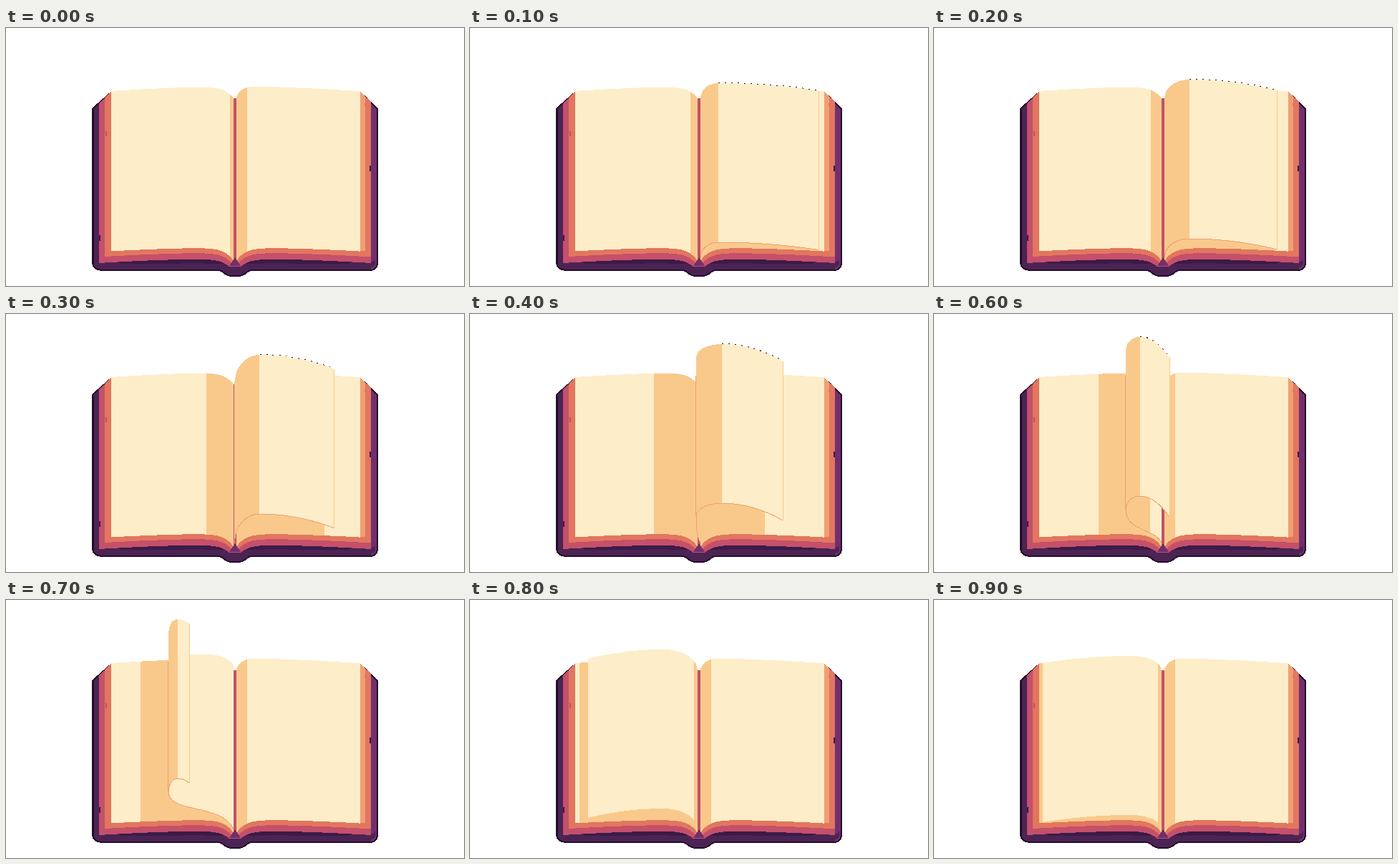
An HTML page for the animation above (1000 ms loop, 640x360 px).

```html
<!DOCTYPE html>
<html lang="en">
<head>
<meta charset="utf-8">
<title>Page turn</title>
<style>
html, body { margin: 0; width: 100%; height: 100%; overflow: hidden; background: #fff; }
svg { display: block; width: 640px; height: 360px; }
</style>
</head>
<body>
<svg id="stage" viewBox="0 0 640 360" shape-rendering="crispEdges"></svg>
<script>
const NS = 'http://www.w3.org/2000/svg';
const stage = document.getElementById('stage');
const INK = '#260d2b', INDIGO = '#3b1a49', PURPLE = '#4b2454', PLUM = '#70306b',
  ROSE = '#c5506a', CORAL = '#e2765f', PEACH = '#ef9f73', TAN = '#f9c98c', CREAM = '#fdedc8';
const MID = 320, LEFT = 147, RIGHT = 495, FRAMES = 10, STEP = 100;
const LEAF_HEIGHT = 222;
let gradients = 0;

function add(parent, tag, attrs) {
  const el = document.createElementNS(NS, tag);
  for (const k in attrs) el.setAttribute(k, attrs[k]);
  return parent.appendChild(el);
}
const fill = (g, d, color) => add(g, 'path', { d, fill: color });
const line = (g, d, color, more) => add(g, 'path', { d, fill: 'none', stroke: color, ...more });

// Points of y = f(x) from one x to another, in either direction
function trace(from, to, f) {
  const n = Math.max(1, Math.ceil(Math.abs(to - from) / 2));
  return Array.from({ length: n + 1 }, (_, i) => {
    const x = from + (to - from) * i / n;
    return x.toFixed(1) + ',' + f(x).toFixed(1);
  }).join(' ');
}

// Vertical stripes: color, x, color, x, ... color
function stripes(g, d, list) {
  const id = 'g' + gradients++;
  const grad = add(g, 'linearGradient', { id, gradientUnits: 'userSpaceOnUse', x1: 0, x2: 640, y1: 0, y2: 0 });
  for (let i = 0; i < list.length; i += 2) {
    for (const x of [list[i - 1] ?? 0, list[i + 1] ?? 640])
      add(grad, 'stop', { offset: x / 640, 'stop-color': list[i] });
  }
  fill(g, d, `url(#${id})`);
}

// Page profiles by distance from the spine
const pageTop = x => {
  const d = Math.abs(x - MID);
  return 81 + 20 * Math.exp(-d / (x < MID ? 13 : 7)) + 7 * (d / 173) ** 1.5;
};
const pageFoot = x => {
  const d = Math.abs(x - MID);
  return 306.5 + 22 * Math.exp(-d / 12) + 5 * (d / 173) ** 2;
};
const corner = x => 88 + Math.max(LEFT - x, x - RIGHT, 0) * 0.9;
const bottom = x => 339 + 8 * Math.exp(-(((x - MID) / 16) ** 4));

const page = (from, to) => `M${trace(from, to, pageTop)} L${trace(to, from, pageFoot)}Z`;

function block(l, r, inset, foot) {
  return `M${l},${corner(l) + inset} L${LEFT},${88 + inset} L160,101 H480 L${RIGHT},${88 + inset}
    L${r},${corner(r) + inset} L${trace(r, l, foot)}Z`;
}
const layer = (drop, limit) => x => Math.min(pageFoot(x) + drop, limit);

function drawCover(g) {
  const rim = { 'stroke-width': 4, 'stroke-linejoin': 'round' };
  const cover = `M122,113 L${LEFT},91 L160,103 H480 L${RIGHT},91 L518,113 V327 Q518,337 508,337
    L${trace(506, 134, x => bottom(x) - 2)} Q122,336 122,326Z`;
  line(g, cover, INK, rim);
  stripes(g, cover, [INK, 123, PURPLE, 510, PLUM, 518, INK]);
  fill(g, `M123,326 H510 Q515,326 516,322 Q518,335 506,335 L${trace(506, 134, x => bottom(x) - 4)} Q124,334 123,326Z`, PURPLE);
  fill(g, `M160,323 H480 L${trace(480, 160, x => Math.min(329, layer(21, 340)(x)))}Z`, INDIGO);
  fill(g, block(130, 510, 2, layer(15.5, 333)), ROSE);
  fill(g, block(138, 510, 1, layer(7, 330)), CORAL);
  fill(g, `M${RIGHT},89 L502,95 V311 H${RIGHT}Z`, PEACH);
  for (const [x, y, h, color] of [[139, 144, 7, ROSE], [501, 105, 4, CORAL], [508, 192, 8, INDIGO], [130, 289, 8, INDIGO]])
    add(g, 'rect', { x, y, width: 2, height: h, fill: color });
}

// Key poses of the moving leaf; rows between are interpolated.
// Step, spine side, crest x, free edge, crest y, fall to the edge, left shadow start, right shadow end
const keys = [
  [0, 322, 337, 495, 82, 6, 313, 495],
  [2, 322, 357, 479, 72, 15, 303, 478],
  [4, 316, 352, 437, 42, 24, 257, 412],
  [5, 295, 320, 383, 42, 22, 238, 353],
  [6, 268, 288, 329, 32, 29, 230, 337],
  [7, 227, 240, 256, 27, 6, 188, 337],
  [8, 318, 270, 165, 69, 13, 153, 337],
  [9, 318, 275, 152, 78, 10, LEFT, 337]
];

function poseAt(step) {
  const i = keys.findLastIndex(k => k[0] <= step), a = keys[i], b = keys[i + 1] || a;
  const u = b === a ? 0 : (step - a[0]) / (b[0] - a[0]);
  const [, near, crest, edge, y, fall, from, to] = a.map((v, j) => v + (b[j] - v) * u);
  return { near, crest, edge, y, fall, from, to };
}

function drawLeaf(g, { near, crest, edge, y, fall }) {
  const curled = near < 318;
  const rise = curled ? 18 : 98 - y;
  // Round on the spine side of the crest, a parabola on the other
  const round = x => y + rise * (1 - Math.sqrt(Math.max(0, 1 - ((x - crest) / (near - crest)) ** 2)));
  const slope = x => y + fall * ((x - crest) / (edge - crest)) ** 2;
  const low = f => x => f(x) + LEAF_HEIGHT;
  const top = trace(near, crest, round) + ' ' + trace(crest, edge, slope);
  const foot = trace(edge, crest, low(slope)) + ' ' + trace(crest, near, low(round));

  if (curled) {
    const end = Math.max(318, 318 + (near - 268) / 12), gap = MID - near, start = y + rise + LEAF_HEIGHT;
    const curl = `M${near},${start} C${near},${start + 32} ${end - gap * 0.2},${318 - gap * 0.38} ${end},319`;
    const back = edge < MID ? trace(318, edge, x => pageTop(x) - 7) : `${end},98 ${near},98`;
    stripes(g, `${curl} L${back} L${near},98Z`, [TAN, Math.min(MID + 4, 302 + 1.8 * (near - 268)), CREAM]);
    line(g, curl, PEACH);
  }
  if (edge > MID) line(g, 'M' + trace(crest, edge, slope), INK, { 'stroke-width': 2, 'stroke-dasharray': '2 7' });
  stripes(g, `M${top} L${foot}Z`, crest < near ? [CREAM, 313, TAN] : [TAN, crest, CREAM]);
  if (crest < near) return;
  line(g, 'M' + foot, PEACH);
  line(g, `M${Math.round(edge) + 0.5},${y + fall} v${LEAF_HEIGHT}`, TAN);
  if (curled) line(g, `M${near - 0.5},86 V${y + rise + LEAF_HEIGHT}`, PEACH);
}

function drawStep(g, step) {
  const pose = poseAt(step);
  stripes(g, page(318, LEFT), [CREAM, pose.from, TAN]);
  stripes(g, page(322, RIGHT), [TAN, step ? pose.to : 337, CREAM]);
  fill(g, 'M318,98 H322 V326 H318Z', ROSE);
  if (step) drawLeaf(g, pose);
  fill(g, 'M320,320 L328,332 H312Z', PLUM);
}

drawCover(add(stage, 'g', {}));
const views = Array.from({ length: FRAMES }, (_, step) => {
  const g = add(stage, 'g', { display: 'none' });
  drawStep(g, step);
  return g;
});

const start = performance.now();
let shown = -1;
function tick() {
  const now = Math.floor((performance.now() - start) / STEP) % FRAMES;
  if (now !== shown) {
    views.forEach((v, i) => v.setAttribute('display', i === now ? 'inline' : 'none'));
    shown = now;
  }
  requestAnimationFrame(tick);
}
tick();
</script>
</body>
</html>
```
